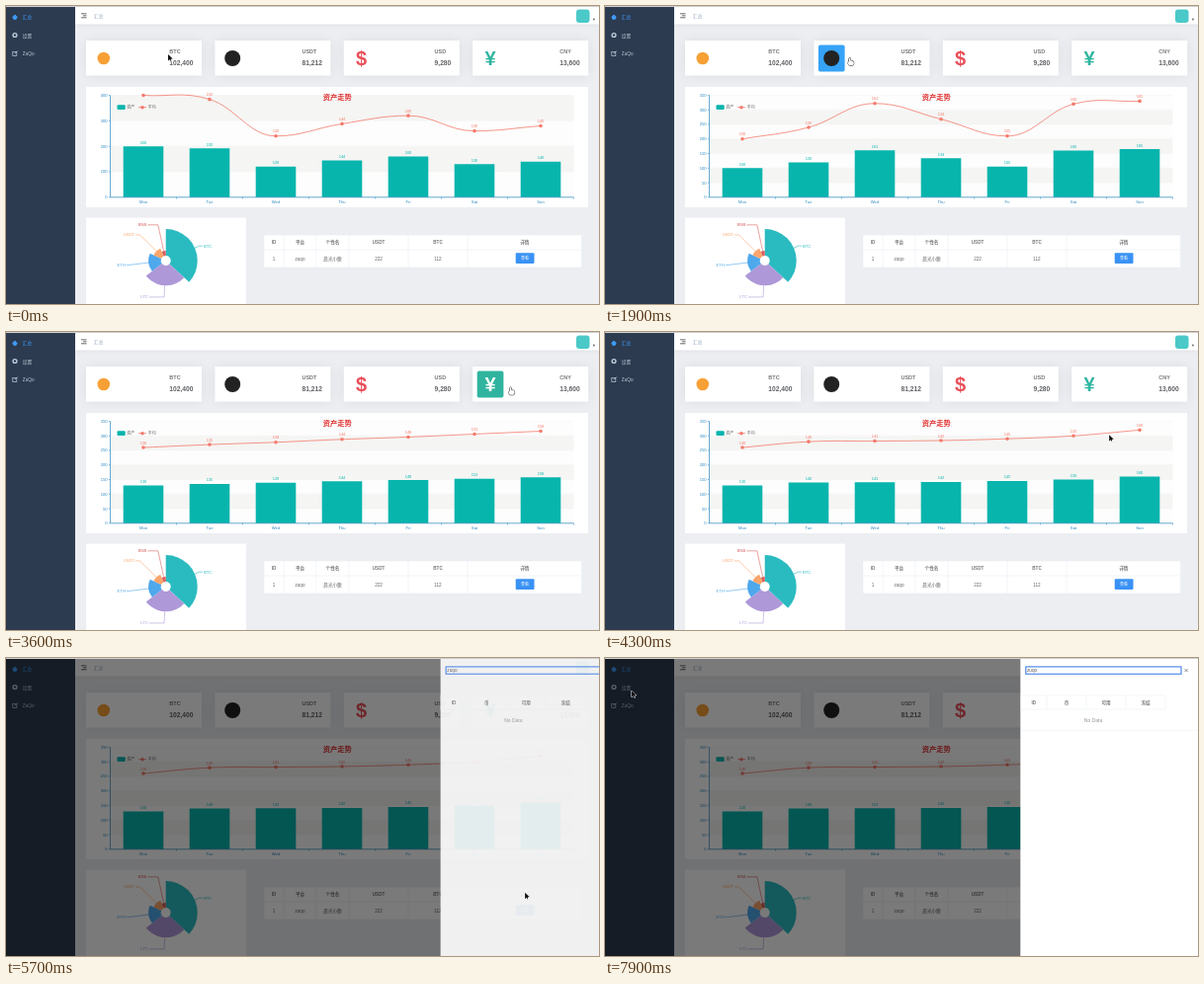
Write an HTML page with a canvas that moves like this. It is 600 px wide and 302 px high and loops after 8 s.

```html
<!DOCTYPE html>
<html lang="zh">
<head>
<meta charset="utf-8">
<title>汇总</title>
<style>
html, body { margin: 0; width: 100%; height: 100%; overflow: hidden; background: #eceef2; }
canvas { display: block; width: 600px; height: 302px; }
</style>
</head>
<body>
<canvas id="stage"></canvas>
<script>
const canvas = document.getElementById('stage');
const ctx = canvas.getContext('2d');
const scale = window.devicePixelRatio || 1;
canvas.width = 600 * scale;
canvas.height = 302 * scale;

const LOOP = 8000, OPEN_AT = 5520;
const FONT = '"Liberation Sans", "Noto Sans CJK SC", "Noto Sans CJK", sans-serif';
const TEAL = '#08b5ad', SALMON = '#f47a6c', AXIS = '#2787bd', HEAD = '#777';
const BASE = 193.8, PLOT = 103.3, LEFT = 105.5, RIGHT = 574.5;
const DAYS = ['Mon', 'Tue', 'Wed', 'Thu', 'Fri', 'Sat', 'Sun'];

const cards = [
  { name: 'BTC', value: '102,400', color: '#f7a035', fill: '#40c9c6', size: 6.3 },
  { name: 'USDT', value: '81,212', color: '#222', fill: '#36a3f7', size: 8 },
  { name: 'USD', value: '9,280', color: '#e9505a', fill: '#ee5158', sign: '$' },
  { name: 'CNY', value: '13,600', color: '#30b5a1', fill: '#30b49f', sign: '¥' }
].map((c, i) => ({ ...c, x: 81 + 130.4 * i }));

// One series per card; clicking a card shows its series.
const sets = {
  BTC: [100, 120, 161, 134, 105, 160, 165],
  USDT: [200, 192, 120, 144, 160, 130, 140],
  USD: DAYS.map((_, i) => Math.round(130 + 4.6 * i)),
  CNY: [130, 140, 141, 142, 145, 150, 160]
};
const clicks = [[-1000, 'USDT'], [1050, 'BTC'], [2000, 'USDT'], [2850, 'USD'], [3800, 'CNY']];

const slices = [
  ['BTC', 320, '#2abbc0'], ['LTC', 240, '#ae98d8'], ['ETH', 149, '#4ea8ec'],
  ['USDT', 100, '#fba56c'], ['BNB', 59, '#d9605f']
];

// Pointer rests: it leaves `from`, takes `span` ms, and stays at x, y.
const rests = [
  { from: 0, span: 1, x: 164, y: 49 },
  { from: 1600, span: 350, x: 275, y: 53 },
  { from: 2200, span: 350, x: 400, y: 52 },
  { from: 2950, span: 500, x: 509, y: 56 },
  { from: 4000, span: 1250, x: 528.5, y: 256 },
  { from: OPEN_AT, span: 2200, x: 27, y: 33 }
];

const clamp = v => Math.max(0, Math.min(1, v));
const easeOut = v => 1 - (1 - clamp(v)) ** 3;
const mix = (a, b, p) => a + (b - a) * p;

function rect(x, y, w, h, color, r = 0) {
  ctx.fillStyle = color;
  ctx.beginPath();
  ctx.roundRect(x, y, w, h, r);
  ctx.fill();
}

function dot(x, y, r, color) {
  ctx.fillStyle = color;
  ctx.beginPath();
  ctx.arc(x, y, r, 0, 7);
  ctx.fill();
}

function path(points, color, width = 0.5) {
  ctx.strokeStyle = color;
  ctx.lineWidth = width;
  ctx.beginPath();
  points.forEach(([x, y]) => ctx.lineTo(x, y));
  ctx.stroke();
}

// Draws centred on y and returns the text width.
function text(str, x, y, size, color, align = 'center', weight = 400) {
  ctx.font = `${weight} ${size}px ${FONT}`;
  ctx.fillStyle = color;
  ctx.textAlign = align;
  ctx.fillText(str, x, y + size * 0.36);
  return ctx.measureText(str).width;
}

function panel(x, y, w, h, blur = 0) {
  ctx.save();
  ctx.shadowColor = 'rgba(0,0,0,.07)';
  ctx.shadowBlur = blur * scale;
  rect(x, y, w, h, '#fff');
  ctx.restore();
}

function pointerAt(t) {
  const i = rests.findLastIndex(r => t >= r.from);
  const b = rests[i], a = rests[Math.max(0, i - 1)];
  const p = clamp((t - b.from) / b.span);
  return { x: mix(a.x, b.x, p * p), y: mix(a.y, b.y, p) };
}

function sidebar() {
  const idle = '#c3cedc', active = '#409eff';
  rect(0, 0, 70, 302, '#2c3b50');
  dot(9, 12, 2.1, active);
  path([[6.4, 11.5], [9, 9], [11.6, 11.5]], active, 1);
  dot(9, 29.5, 2.6, idle);
  dot(9, 29.5, 1.2, '#2c3b50');
  ctx.strokeStyle = idle;
  ctx.lineWidth = 0.7;
  ctx.strokeRect(6.8, 46.5, 4, 4);
  path([[8.8, 48.4], [11.6, 45.6]], idle, 0.8);
  ['汇总', '设置', 'ZuQo'].forEach((s, i) => text(s, 16.8, 11.3 + 18.6 * i, 4.7, i ? idle : active, 'left'));
}

function navbar() {
  panel(70, 0, 530, 18.5, 5);
  for (let i = 0; i < 3; i++) path([[76 + i % 2 * 2, 7.8 + 2 * i], [81.5, 7.8 + 2 * i]], '#444', 0.8);
  text('汇总', 89, 10, 4.7, '#97a8be', 'left');
  rect(577, 3.5, 13.5, 13.5, '#4ac9c8', 3);
  text('▾', 595, 13.5, 4.5, '#555');
}

function drawCards(hovered) {
  for (const c of cards) {
    const on = c === hovered, cx = c.x + 17.8, right = c.x + 108.5;
    panel(c.x, 35, 117, 35.5, 13);
    if (on) rect(c.x + 4.5, 39.5, 26.7, 27, c.fill, 2);
    if (c.sign) text(c.sign, cx, 53, 20, on ? '#fff' : c.color, 'center', 700);
    else dot(cx, 53, c.size, c.color);
    const width = text(c.value, right, 57.5, 6.7, '#606266', 'right', 700);
    text(c.name, right - width, 46.5, 5.5, HEAD, 'left', 700);
  }
}

// Curve that is flat at each peak and valley.
function smoothLine(pts) {
  const slope = pts.map((p, i) => {
    if (!i || i === pts.length - 1) return null;
    const a = p.y - pts[i - 1].y, b = pts[i + 1].y - p.y;
    return a * b <= 0 ? 0 : (a + b) / 2;
  });
  ctx.strokeStyle = SALMON;
  ctx.lineWidth = 0.8;
  ctx.beginPath();
  ctx.moveTo(pts[0].x, pts[0].y);
  for (let i = 0; i < pts.length - 1; i++) {
    const a = pts[i], b = pts[i + 1], k = 0.4, dx = b.x - a.x, dy = b.y - a.y;
    ctx.bezierCurveTo(a.x + dx * k, a.y + (slope[i] ?? dy) * k,
      b.x - dx * k, b.y - (slope[i + 1] ?? dy) * k, b.x, b.y);
  }
  ctx.stroke();
}

function axisFor(data) {
  const peak = 2 * Math.max(...data), step = peak > 350 ? 100 : 50;
  return { step, max: Math.ceil(peak / step) * step };
}

function chart(t) {
  const n = clicks.findLastIndex(([at]) => t >= at);
  const data = sets[clicks[n][1]], old = sets[clicks[Math.max(0, n - 1)][1]];
  const { step, max } = axisFor(data), oldMax = axisFor(old).max;
  const p = easeOut((t - clicks[n][0]) / 300);
  const band = PLOT * step / max;
  panel(81, 82, 508, 122);

  for (let v = 0, y = BASE; v <= max; v += step, y -= band) {
    if (v < max) rect(LEFT, y - band, RIGHT - LEFT, band, v / step % 2 ? '#f5f5f3' : '#fdfdfd');
    path([[LEFT, y], [RIGHT, y]], '#efefef', 0.4);
    path([[LEFT - 1.8, y], [LEFT, y]], AXIS);
    text(v, 102.5, y, 4.1, AXIS, 'right');
  }

  const pts = data.map((v, i) => {
    const h = PLOT * mix(old[i] / oldMax, v / max, p), x = 139 + 67 * i;
    rect(x - 20.3, BASE - h, 40.6, h, TEAL);
    text(v, x, BASE - h - 4, 4, TEAL);
    text(DAYS[i], x, 198.3, 4.2, AXIS);
    path([[x + 33.5, BASE], [x + 33.5, BASE + 1.8]], AXIS);
    return { x, y: BASE - 2 * h, v };
  });
  path([[LEFT, BASE - PLOT], [LEFT, BASE], [RIGHT, BASE]], AXIS, 0.7);

  smoothLine(pts);
  for (const q of pts) {
    dot(q.x, q.y, 1.8, SALMON);
    if (q.y > 92) text(q.v, q.x, q.y - 4.8, 4, SALMON);
  }

  text('资产走势', 335.3, 92.3, 7.3, '#e02f2f', 'center', 700);
  rect(112.5, 100.3, 8.2, 4.8, TEAL, 1);
  text('资产', 122.3, 102.5, 4, '#666', 'left');
  path([[134, 102.7], [142, 102.7]], SALMON, 0.8);
  dot(138, 102.7, 1.8, SALMON);
  text('平均', 143.8, 102.5, 4, '#666', 'left');
}

function pie() {
  const cx = 161.7, cy = 258, total = slices.reduce((sum, s) => sum + s[1], 0);
  panel(81, 214.5, 162, 100);
  let a = -Math.PI / 2;
  for (const [name, v, color] of slices) {
    const end = a + v / total * Math.PI * 2, mid = (a + end) / 2;
    const r = 5 + 27 * v / slices[0][1];
    ctx.fillStyle = color;
    ctx.beginPath();
    ctx.arc(cx, cy, r, a, end);
    ctx.arc(cx, cy, 5, end, a, true);
    ctx.fill();
    // Leaders bend on one circle and end on a wider one, where the labels sit.
    const side = Math.sign(Math.cos(mid)), dy = 37 * Math.sin(mid);
    const labelX = cx + side * Math.sqrt(41 ** 2 - dy ** 2);
    path([[cx + r * Math.cos(mid), cy + r * Math.sin(mid)],
      [cx + 37 * Math.cos(mid), cy + dy], [labelX - side, cy + dy]], color, 0.6);
    text(name, labelX, cy + dy, 4.2, color, side > 0 ? 'left' : 'right');
    a = end;
  }
}

// Grid with one text per cell; the first row is the header.
function grid(x, widths, ys, rows) {
  const xs = [x];
  widths.forEach(w => xs.push(xs.at(-1) + w));
  xs.forEach(v => path([[v, ys[0]], [v, ys.at(-1)]], '#e6eaf1'));
  ys.forEach(v => path([[x, v], [xs.at(-1), v]], '#e6eaf1'));
  rows.forEach((row, r) => row.forEach((s, i) =>
    text(s, (xs[i] + xs[i + 1]) / 2, (ys[r] + ys[r + 1]) / 2, 4.6, r ? '#606266' : HEAD, 'center', r ? 400 : 700)));
}

function table(rowOn, buttonOn) {
  rect(261, 232, 321.5, 33, '#fff');
  if (rowOn) rect(261, 247, 321.5, 18, '#eff2f6');
  grid(261, [20, 33, 33, 60, 60, 115.5], [232, 247, 265], [
    ['ID', '平台', '个性名', 'USDT', 'BTC', '详情'],
    ['1', 'zuqo', '晨光小鹿', '222', '112']
  ]);
  rect(515.7, 250.3, 18.8, 10.8, buttonOn ? '#5facff' : '#3a92f5', 1);
  text('查看', 525, 255.6, 4, '#fff');
}

function drawer(p) {
  rect(0, 0, 600, 302, `rgba(0,0,0,${0.52 * clamp(p * 1.15)})`);
  ctx.save();
  ctx.translate(180 * (1 - p), 0);
  ctx.globalAlpha = p;
  rect(420.3, 0, 180, 302, '#fff');
  ctx.strokeStyle = '#3f7fe8';
  ctx.lineWidth = 1.1;
  ctx.strokeRect(425.8, 8.9, 157.2, 7.3);
  text('zuqo', 427, 12.5, 4.7, '#555', 'left');
  text('×', 588, 12, 8, HEAD);
  grid(420.5, [26.5, 40, 40, 40], [38, 52], [['ID', '币', '可用', '冻结']]);
  path([[420.5, 73.5], [600, 73.5]], '#eceff4');
  text('No Data', 494, 63.3, 5, '#909399');
  ctx.restore();
}

function pointer({ x, y }, hand) {
  ctx.beginPath();
  if (hand) {
    ctx.roundRect(x + 0.8, y, 1.6, 5, 0.8);
    ctx.roundRect(x, y + 3, 5.6, 4.8, 1.8);
  } else {
    [[0, 0], [0, 6.6], [1.6, 5.2], [3, 7.4], [2.8, 4.7], [4.7, 4.6]].forEach(([dx, dy]) => ctx.lineTo(x + dx, y + dy));
    ctx.closePath();
  }
  ctx.fillStyle = hand ? '#fff' : '#111';
  ctx.strokeStyle = hand ? '#222' : '#fff';
  ctx.lineWidth = 1;
  ctx.stroke();
  ctx.fill();
}

function draw(ms) {
  const t = ms % LOOP;
  const m = pointerAt(t);
  const open = easeOut((t - OPEN_AT) / 345);
  const live = t > 100 && !open;
  const card = live && m.y > 35 && m.y < 70 && cards.find(c => m.x > c.x && m.x < c.x + 117);
  const row = live && m.y > 247 && m.y < 265;

  ctx.setTransform(scale, 0, 0, scale, 0, 0);
  rect(0, 0, 600, 302, '#eceef2');
  navbar();
  sidebar();
  drawCards(card);
  chart(t);
  pie();
  table(row, row && m.x > 515 && m.x < 535);
  if (open) drawer(open);
  rect(0, 0, 600, 1, '#cfd0d2');
  pointer(m, card);
  requestAnimationFrame(draw);
}
requestAnimationFrame(draw);
</script>
</body>
</html>
```
